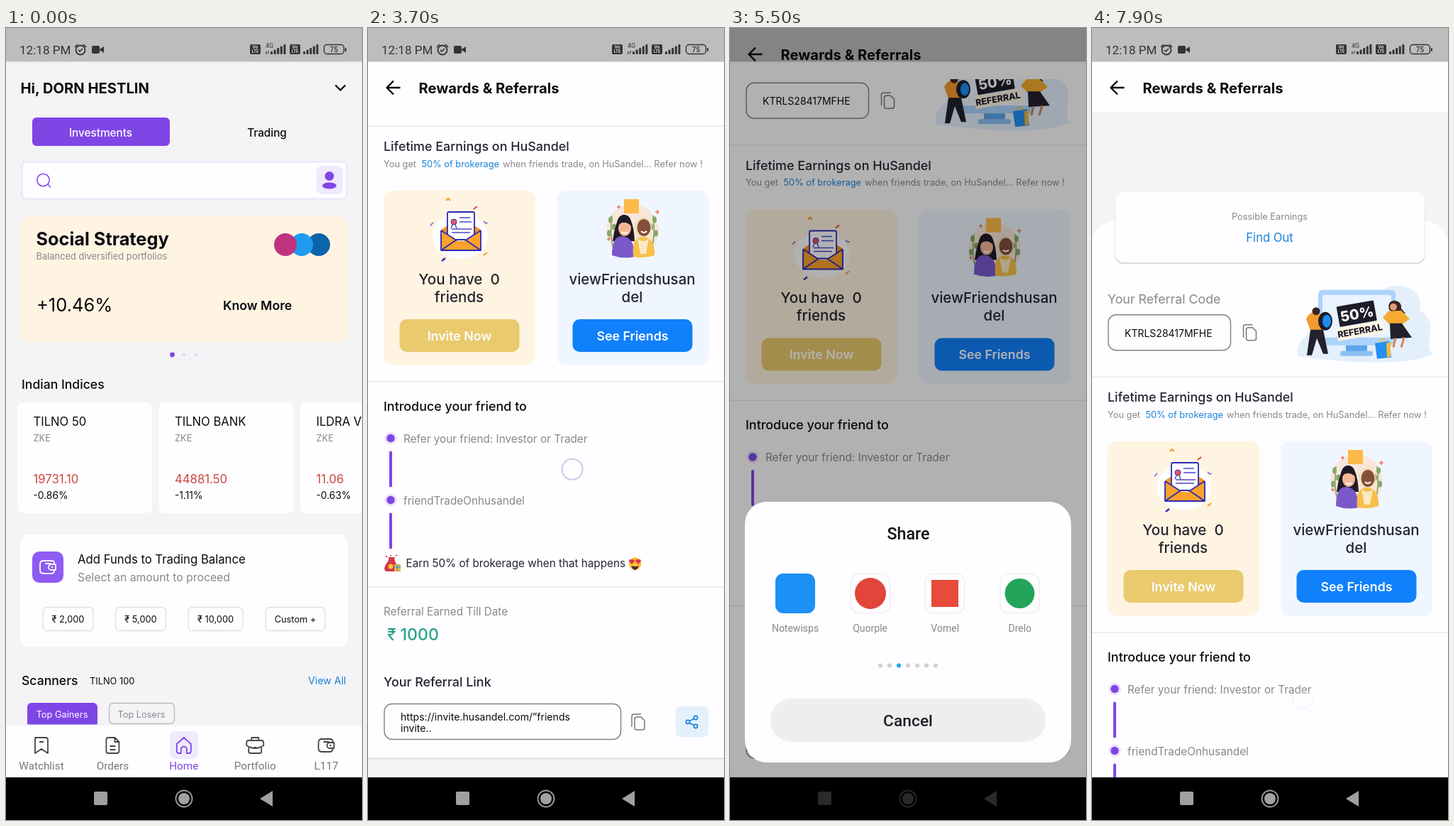
An HTML page for the animation above (8000 ms loop, 502 px wide and 1115 px high).

```html
<!DOCTYPE html>
<html lang="en">
<head>
<meta charset="utf-8">
<title>Referral walkthrough</title>
<style>
html, body { margin: 0; width: 100%; height: 100%; overflow: hidden; background: #fefdff; }
svg { display: block; width: 502px; height: 1115px; font-family: Inter, sans-serif; }
.roboto { font-family: Roboto, sans-serif; }
</style>
</head>
<body>
<svg id="stage" viewBox="0 0 502 1115"></svg>
<script>
const WHITE = '#fefdff', PAPER = '#f4f3f6', INK = '#0c0b10', DARK = '#262431', GREY = '#88878c',
      PURPLE = '#7f46e6', LILAC = '#f0e9fb', BLUE = '#1983dc', RED = '#c9473f', CREAM = '#fff4e1', LINE = '#e9e8eb';

// Shape helpers; text is placed by the middle of its capitals.
const rect = (x, y, w, h, r, fill, more = '') =>
  `<rect x="${x}" y="${y}" width="${w}" height="${h}" rx="${r}" fill="${fill}" ${more}/>`;
const circle = (x, y, r, fill, more = '') => `<circle cx="${x}" cy="${y}" r="${r}" fill="${fill}" ${more}/>`;
const oval = (x, y, rx, ry, fill) => `<ellipse cx="${x}" cy="${y}" rx="${rx}" ry="${ry}" fill="${fill}"/>`;
const shape = (d, fill) => `<path d="${d}" fill="${fill}"/>`;
const line = (d, color, w = 1.8) =>
  `<path d="${d}" fill="none" stroke="${color}" stroke-width="${w}" stroke-linejoin="round"/>`;
const text = (x, y, size, str, fill = INK, weight = 400, more = '') =>
  `<text x="${x}" y="${y + size * .36}" font-size="${size}" font-weight="${weight}" fill="${fill}" ${more}>${str}</text>`;
const mid = (x, y, size, str, fill, weight, more = '') =>
  text(x, y, size, str, fill, weight, 'text-anchor="middle" ' + more);
const group = (id, body) => `<g id="${id}">${body}</g>`;
const at = (x, y, body) => `<g transform="translate(${x} ${y})">${body}</g>`;
const each = (list, fn) => list.map(fn).join('');
const outline = (color, w = 1.3) => `stroke="${color}" stroke-width="${w}"`;
const ROBOTO = 'class="roboto"';

const wallet = (x, y, color) => at(x, y,
  line('M9 -4V-6Q9 -9 5 -9H-6Q-11 -9 -11 -4V4Q-11 9 -6 9H5Q9 9 9 5V4M-4 -5H4M11 -4H5A4 4 0 0 0 5 4H11Z', color) +
  circle(6, 0, 1.2, color));
const copyIcon = (x, y) => at(x, y,
  line('M-9 7V-8Q-9 -11 -6 -11H4M-5 -4Q-5 -7 -2 -7H4L9 -2V8Q9 11 6 11H-2Q-5 11 -5 8Z', '#77767b', 1.5));
const backArrow = line('M45.5 84H27M36 74.5L26.5 84L36 93.5', INK, 2.4);

const signal = x => each([0, 1, 2, 3, 4], i => rect(x + i * 4.6, 33 - i * 2.5, 3, 4 + i * 2.5, 1, '#343336'));
const volte = x => rect(x, 23, 15, 14, 2, '#343336') +
  mid(x + 7.5, 27.2, 6, 'Vo', '#ddd', 700) + mid(x + 7.5, 33, 5.5, 'LTE', '#ddd', 700);
const statusIcons = text(19, 30.5, 17.1, '12:18 PM', '#343336', 400, ROBOTO) +
  circle(105, 31, 6.5, 'none', outline('#343336', 1.8)) +
  line('M97 27L101 23M113 27L109 23M102 31L104 33L108 29', '#343336', 1.7) +
  rect(121, 25, 11, 11, 2, '#343336') + shape('M132 30L138 26V35L132 31Z', '#343336') +
  volte(344) + text(366, 25, 9, '4G', '#343336', 400, ROBOTO) +
  line('M367 37V33M370 32V36', '#343336', 1.2) + signal(373) + volte(400) + signal(419) +
  rect(448.5, 23.5, 28, 13, 4, 'none', outline('#343336', 1.4)) +
  mid(462.5, 30, 10, '75', '#343336', 500, ROBOTO) + rect(478, 28, 2, 5, 1, '#343336');

const navIcons = rect(124, 1075, 19, 19, 2, '#a09fa1') +
  circle(251, 1085, 11.5, 'none', outline('#a09fa1', 1.8)) + circle(251, 1085, 8, '#a09fa1') +
  shape('M358 1085L376 1074V1096Z', '#a09fa1');

const indexCard = (x, name, value, change) => rect(x, 527, 190, 156, 8, WHITE) +
  text(x + 22.5, 554, 16.6, name) + text(x + 22.5, 577.5, 12.8, 'ZKE', GREY) +
  text(x + 22.5, 635, 16.7, value, RED) + text(x + 22.5, 658.5, 13.8, change);

const tabs = [
  ['Watchlist', 'M-9 -11H6Q9 -11 9 -8V11L0 5L-9 11V-8Q-9 -11 -6 -11ZM-3 -5H3'],
  ['Orders', 'M-9 -8Q-9 -11 -6 -11H3L9 -5V8Q9 11 6 11H-6Q-9 11 -9 8ZM3 -11V-5H9M-4 1H4M-4 6H4'],
  ['Home', 'M-10 -2L0 -11L10 -2V8Q10 11 7 11H4V4Q0 -1 -4 4V11H-7Q-10 11 -10 8Z'],
  ['Portfolio', 'M-12 -4Q-12 -7 -9 -7H9Q12 -7 12 -4V0Q0 8 -12 0ZM-5 -7V-11H5V-7M-9 3V9Q-9 11 -6 11H6Q9 11 9 9V3M-2 3H2'],
  ['L117', '']];

const home = rect(0, 48, 502, 1010, 0, PAPER) +
  text(20.5, 84.5, 20.2, 'Hi, DORN HESTLIN', INK, 700) + line('M464.5 80.5L471.5 87.5L478.5 80.5', INK, 2.4) +
  rect(37, 126, 194, 40, 6, PURPLE) + mid(133.5, 147, 15.3, 'Investments', WHITE, 500) +
  mid(368, 147, 15.3, 'Trading', INK, 500) +
  rect(22.5, 188.5, 458, 52, 6, WHITE, outline('#ebe7fb', 2.5)) +
  circle(52.5, 214, 8.7, 'none', outline(PURPLE, 1.5)) + line('M59 220L63 224.5', PURPLE, 1.5) +
  rect(438, 194, 37, 40, 8, LILAC) + circle(456, 208.5, 6.5, PURPLE) + oval(456, 222, 10, 4.5, PURPLE) +
  rect(20, 265, 462, 178, 13, CREAM) + text(42.5, 297, 25.3, 'Social Strategy', INK, 700) +
  text(42.5, 321.5, 12.9, 'Balanced diversified portfolios', GREY) +
  circle(441, 305, 16, '#0c64ab') + circle(417, 305, 16, '#1f9bee') + circle(394, 305, 16, '#bf327f') +
  text(43, 390, 25.5, '+10.46%') + text(306, 391, 17.7, 'Know More', INK, 600) +
  circle(234.5, 460, 3.4, PURPLE) + circle(251, 460, 2, '#dcd3f4') + circle(267.5, 460, 2, '#dcd3f4') +
  text(22, 501.5, 17.6, 'Indian Indices', INK, 500) +
  indexCard(16, 'TILNO 50', '19731.10', '-0.86%') + indexCard(215.5, 'TILNO BANK', '44881.50', '-1.11%') +
  indexCard(415, 'ILDRA VI', '11.06', '-0.63%') +
  rect(20, 713, 462, 158, 13, WHITE) + rect(37, 737, 44, 44, 10, '#8e5bf3') + wallet(59, 759, WHITE) +
  text(101, 748, 16.7, 'Add Funds to Trading Balance') +
  text(101, 773, 15.8, 'Select an amount to proceed', GREY) +
  each([[52, 71, '₹ 2,000'], [154.5, 71, '₹ 5,000'], [257, 77, '₹ 10,000'], [366, 84, 'Custom +']], ([x, w, s]) =>
    rect(x, 815.5, w, 33, 6, WHITE, outline('#e0dfe3')) + mid(x + w / 2, 832.5, 12.8, s)) +
  text(22, 919, 17.6, 'Scanners', INK, 500) + text(118, 919, 12.8, 'TILNO 100') +
  text(426, 919, 14.2, 'View All', BLUE) +
  rect(30, 950, 99, 34, 6, PURPLE) + mid(79, 966, 12.8, 'Top Gainers', WHITE) +
  rect(145.5, 950.5, 92, 29, 6, 'none', outline('#b9b8bc')) + mid(191, 966, 12.8, 'Top Losers', GREY) +
  rect(-1, 981, 504, 80, 0, WHITE, outline('#ebeaee', 1)) + rect(231, 990, 40, 39, 8, LILAC) +
  each(tabs, ([name, d], i) => {
    const x = 50 + i * 100.4, on = i == 2;
    return (d ? at(x, 1010, line(d, on ? PURPLE : '#45444a')) : wallet(x, 1010, '#45444a')) +
      mid(x, 1038, 15.3, name, on ? PURPLE : '#77767b', 400, ROBOTO);
  });

const menu = (top, names) => rect(0, top, 502, names.length * 72.7, 15, WHITE) + each(names, (name, i) => {
  const y = top + 36.4 + i * 72.75;
  return text(20, y, 17.8, name, '#16151b') + line(`M462 ${y - 6.5}l6.5 6.5l-6.5 6.5`, INK, 2.4) +
    (i ? rect(0, y - 37, 502, 1.5, 0, LINE) : '');
});
const account = rect(0, 48, 502, 1010, 0, PAPER) + rect(0, 0, 502, 119, 0, WHITE) +
  at(-1, 0, backArrow) + text(92, 84.5, 20.2, 'Account', INK, 700) +
  rect(0, 119, 502, 123, 0, LILAC) + circle(60.5, 180, 41, WHITE) +
  circle(60.5, 174, 7.5, 'none', outline(PURPLE, 2.5)) + line('M49 194C49 179 72 179 72 194', PURPLE, 2.5) +
  text(122, 165.5, 20.4, 'DORN HESTLIN', '#16151b') + text(122, 199, 15.3, 'L117', '#16151b') +
  line('M469 169L481 180.5L469 192', '#77767b', 2.5) +
  menu(241.5, ['Funds', 'Trade Settings', 'Rewards &amp; Referrals', 'About', 'External Apps', 'Link Family Accounts']) +
  text(11, 715, 17.8, 'Security', DARK) + menu(737, ['Support Portal', 'User Manual', 'Contact']) +
  text(11, 991, 17.8, 'Reports', DARK) + menu(1013.5, ['P&amp;L', 'Tax']);

const referralArt =
  shape('M290 370C286 345 308 345 312 325C320 288 360 295 395 290C410 262 470 264 462 305C492 325 466 350 480 368C430 388 330 376 290 370Z', '#e4effc') +
  rect(358, 352, 30, 12, 2, '#5fa5ec') + rect(350, 363, 46, 7, 3, '#8cc0f5') +
  rect(319, 277, 109, 78, 6, '#acd3fb') + rect(325, 284, 97, 60, 3, '#eaf4ff') +
  `<g transform="rotate(-10 373 312)">` + rect(347, 296, 53, 29, 1, '#1d1c2a') +
  mid(374, 311, 20, '50%', WHITE, 800) + rect(341, 326, 67, 18, 1, '#fff6e4') +
  mid(374, 335, 12.5, 'REFERRAL', '#1d1c2a', 800) + '</g>' +
  shape('M302 318Q308 304 321 310L330 318L325 336L308 334Z', '#f29a2e') + circle(316, 307, 5.5, '#3a2420') +
  shape('M308 333H326L333 367H326L317 345L310 369H303Z', '#22212c') +
  oval(329, 321, 10, 13, '#1d1c2a') + oval(331, 321, 6, 9, '#1b8cf0') +
  shape('M419 305Q416 293 426 292Q437 293 436 303L442 310L428 312Z', '#3b2226') + circle(425, 301, 5, '#e39a74') +
  shape('M418 307L436 306L448 318L436 326H420L410 316Z', '#f5ab2f') +
  shape('M420 324H437L451 344L421 346Z', '#22212c') +
  line('M428 345L425 358M440 344L436 358', '#d9825c', 3) +
  shape('M399 352L419 349L422 372L402 374Z', '#2490ef') + shape('M415 352L421 350V371L416 372Z', '#f6b73b') +
  line('M405 351Q408 341 413 350', '#f6b73b', 1.5);

const inviteArt = oval(130, 293, 39, 32, WHITE) +
  shape('M103 284L131 266L159 284V312H103Z', '#f49320') +
  rect(112, 259, 38, 45, 2, WHITE, outline('#2c2bb4', 1.8)) +
  line('M129 267H144M129 273H146M118 283H146M118 288H144', '#4947c8', 1.5) +
  circle(121, 273, 4, '#ea5664', outline('#2c2bb4', 1)) + line('M119 277L117 282M123 277L125 282', '#2c2bb4', 1.2) +
  shape('M103 285L127 300H135L159 285V313H103Z', '#fca12b') +
  line('M103 285V313H159V285M103 313L125 298H137L159 313M103 285L125 299M159 285L137 299', '#2c2bb4', 1.8) +
  line('M110 243L113 240L116 243M163 320L168 316', '#f39a2c', 2.2) + line('M149 255L154 251', '#e34c4c', 2.2) +
  line('M104 328L109 324', '#2c2bb4', 2.4) + line('M88 278L92 274M163 272L166 275L169 274', '#8a79e0', 1.8);

const friendsArt = circle(373, 285, 37, '#f8e6da') + rect(361, 241, 21, 20, 0, '#fdba4a') +
  line('M348 316Q340 295 344 264M398 316Q406 295 402 264', '#7a9a62', 1.5) +
  each([[342, 270], [347, 280], [340, 289], [404, 270], [399, 280], [406, 289]], ([x, y]) => oval(x, y, 3, 4.5, '#86a868')) +
  shape('M345 300Q350 263 361 263Q374 263 376 300Z', '#1f1a25') + oval(388, 281, 12, 15, '#f2dfbd') +
  shape('M344 320Q344 293 358 293Q376 294 376 322Q360 326 344 320Z', '#7a58c9') +
  shape('M374 322Q371 294 388 294Q405 295 404 320Q390 325 374 322Z', '#f6c04a') +
  shape('M380 296Q388 304 396 296L392 318H384Z', '#fbe9c4') +
  oval(362, 282, 9, 11, '#f4b795') + oval(389, 281, 9.5, 12, '#84503a') +
  shape('M351 281Q358 268 371 278Q372 264 361 263Q350 264 351 281Z', '#1f1a25') +
  line('M358 287Q362 291 366 287M385 286Q389 290 393 286', WHITE, 2) +
  line('M337 297H342M339.5 294.5V299.5M405 259H411M408 256V262M351 252H356M353.5 249.5V254.5', '#ee7468', 1.6);

const step = (y, label) => circle(32, y, 9, '#ece4fa') + circle(32, y, 5.7, PURPLE) +
  rect(30, y + 18, 4, 51, 2, PURPLE) + text(50, y + .5, 15.3, label, GREY);
const divider = y => rect(0, y, 502, 1.5, 0, LINE);
const action = (x, fill, label) => rect(x, 410, 169, 46, 10, fill) + mid(x + 84.5, 433.5, 17.8, label, WHITE, 600);

const rewardsTop = shape('M0 212A32 32 0 0 1 32 180H470A32 32 0 0 1 502 212V1289H0Z', WHITE) +
  rect(0, 1289, 502, 1.5, 0, '#d6d5d9') +
  rect(32.5, 141, 437, 99.5, 12, '#d9d8dc') + rect(33, 139.5, 436, 99, 12, WHITE) +
  mid(250.5, 173.5, 12.8, 'Possible Earnings', GREY) + mid(250.5, 203.5, 16.6, 'Find Out', BLUE) +
  text(22, 289.5, 17.8, 'Your Referral Code', GREY) +
  rect(23, 312, 172.5, 50, 11, WHITE, outline('#828186', 1.4)) + text(46, 338, 14, 'KTRLS28417MFHE') +
  copyIcon(222.5, 337) + referralArt;

const rewardsRest = divider(137.5) + text(22, 167, 17.9, 'Lifetime Earnings on HuSandel', DARK, 500) +
  text(22, 191, 12.8, 'You get', GREY) + text(75.5, 191, 12.8, '50% of brokerage', BLUE) +
  text(190, 191, 12.8, 'when friends trade, on HuSandel... Refer now !', GREY) +
  rect(22, 228.5, 214, 246, 13, CREAM) + rect(266, 228.5, 214, 246, 13, '#eff6ff') + inviteArt + friendsArt +
  mid(128.5, 353.5, 20.6, 'You have&#160; 0', DARK, 500) + mid(128.5, 378.5, 20.6, 'friends', DARK, 500) +
  mid(372.5, 353.5, 20.5, 'viewFriendshusan', DARK, 500) + mid(372.5, 378.5, 20.5, 'del', DARK, 500) +
  action(44.5, '#e9ca6d', 'Invite Now') + action(288.5, '#1080fb', 'See Friends') + divider(497) +
  text(22, 532.5, 17.9, 'Introduce your friend to', INK, 500) +
  step(577.5, 'Refer your friend: Investor or Trader') + step(664.5, 'friendTradeOnhusandel') +
  shape('M29 745H38Q36 749 40 754Q44 765 39 765H26Q21 764 25 755Q30 750 29 745Z', '#d5364a') +
  line('M25 743L27 745M32 742V744M39 743L41 742', '#d5364a', 1.5) + circle(32, 758, 3.5, '#f8c53f') +
  rect(37, 755, 9, 10, 1, '#f3b13c') + line('M41.5 755V765M37 759H46', '#3fa0d8', 1.5) +
  text(53.5, 754, 15.25, 'Earn 50% of brokerage when that happens', DARK) +
  circle(376.5, 754, 8.8, '#fbc23a') + shape('M371 757Q376.5 759 382 757Q380 763 376.5 763Q373 763 371 757Z', '#59302a') +
  each([372, 381], x => shape(`M${x} 755L${x - 4} 750.5Q${x - 3} 746.5 ${x} 749Q${x + 3} 746.5 ${x + 4} 750.5Z`, '#e2324a')) +
  divider(786.5) + text(22, 821, 15.3, 'Referral Earned Till Date', GREY) +
  text(27, 854, 23, '₹', '#27a48c', 500) + text(45.5, 854, 23.2, '1000', '#27a48c', 500) +
  text(22, 920.5, 17.9, 'Your Referral Link', DARK, 500) +
  rect(23, 951.5, 333.5, 50, 11, WHITE, outline('#828186', 1.4)) +
  text(46, 969.5, 14.1, 'https://invite.husandel.com/”friends') + text(46, 986, 14.1, 'invite..') +
  copyIcon(381, 977) + rect(434, 955, 46, 43.5, 7, '#e3f1fc') +
  line('M451 977L462 971M451 977L462 983', BLUE, 1.7) +
  each([[451, 977], [462, 971], [462, 983]], ([x, y]) => circle(x, y, 2.6, '#e3f1fc', outline(BLUE, 1.7)));

const rewards = rect(0, 48, 502, 1060, 0, PAPER) + group('scroll', rewardsTop + at(0, 261.3, rewardsRest)) +
  rect(0, 0, 502, 119, 0, WHITE) + backArrow + text(71.5, 84.5, 20.2, 'Rewards &amp; Referrals', INK, 700);

const apps = ['Notewisps', 'Quorple', 'Vomel', 'Drelo'];
const tile = x => rect(x - 27.5, 768.5, 55, 55, 11, WHITE, outline('#f0eff2', 1.5));
const sheet = rect(21, 667, 460, 367, 31, WHITE) + mid(251.5, 712, 23.3, 'Share', '#141318', 500, ROBOTO) +
  rect(64, 768, 56, 56, 11, '#1d90f5') +
  tile(198) + circle(198, 796, 22, '#e2453a') + tile(303) + rect(284, 777, 38, 38, 0, '#e84a3c') +
  tile(408.5) + circle(408.5, 796, 21, '#22a55b') +
  each(apps, (name, i) => mid(92 + i * 105.6, 845, 14, name, GREY, 400, ROBOTO)) +
  each([0, 1, 2, 3, 4, 5, 6], i => circle(212 + i * 13, 897.5, 3.1, i == 2 ? '#25aeee' : '#d2d1d5')) +
  rect(57, 944, 388, 61, 30, '#efedf0') + mid(251, 975, 22.8, 'Cancel', '#202025', 500, ROBOTO);

const stage = document.getElementById('stage');
stage.innerHTML = home + group('account', account) + group('rewards', rewards) +
  rect(0, 0, 502, 47.5, 0, '#000', 'opacity=".255"') + group('status', statusIcons) +
  rect(0, 1055, 502, 60, 0, '#000') + group('nav', navIcons) +
  rect(0, 0, 502, 1115, 0, '#000', 'id="dim"') + group('sheet', sheet) +
  circle(0, 0, 14.5, '#ffffff88', 'id="touch" stroke="#b4bce0" stroke-opacity=".75" stroke-width="2"');

const part = Object.fromEntries(['account', 'rewards', 'scroll', 'status', 'nav', 'dim', 'sheet', 'touch']
  .map(id => [id, document.getElementById(id)]));
const move = (el, x, y) => el.setAttribute('transform', `translate(${x.toFixed(2)} ${y.toFixed(2)})`);
const fade = (el, a) => el.setAttribute('opacity', a);

// Critically damped slide from the right edge.
const slideIn = ms => { const u = Math.max(0, ms) * .017; return 502 * Math.exp(-u) * (1 + u); };

// Keys are [time, value] pairs, joined with a soft ease-out.
function follow(keys, t) {
  const i = keys.findIndex(k => k[0] > t);
  if (i < 0) return keys[keys.length - 1][1];
  if (i == 0) return keys[0][1];
  const [a, from] = keys[i - 1], [b, to] = keys[i];
  return from + (to - from) * (1 - (1 - (t - a) / (b - a)) ** 2);
}
const SCROLL = [[3100, 0], [3700, -261.3], [4200, -234.8], [7500, -234.8], [7900, 91.7]];
const SHEET = [[4700, 367], [5000, 0], [7350, 0], [7500, 448]];
const DIM = [[4700, .12], [5000, .3], [7350, .3], [7500, .05]];
// start, end, x, y, dragging
const TOUCHES = [[700, 880, 456, 214, 0], [1990, 2090, 240, 424, 0], [3050, 3850, 288, 882.5, 1],
  [4400, 4580, 457, 1003, 0], [6400, 6750, 117, 825, 0], [7500, 7925, 297, 852, 1]];

function draw(now) {
  const t = Math.floor((now + 16) / 100) * 100 % 8000;   // ten pictures a second
  const modal = t >= 4700 && t < 7500, lift = modal ? -47 : 0, scroll = follow(SCROLL, t);
  move(part.account, slideIn(t - 894), 0);
  move(part.rewards, slideIn(t - 2085), lift);
  move(part.scroll, 0, scroll - lift);
  fade(part.status, modal && t > 4800 ? 0 : 1);
  fade(part.nav, modal ? .38 : 1);
  fade(part.dim, modal ? follow(DIM, t) : 0);
  fade(part.sheet, modal ? 1 : 0);
  move(part.sheet, 0, follow(SHEET, t));
  const touch = TOUCHES.find(([a, b]) => t >= a && t < b);
  fade(part.touch, touch ? Math.min(1, (touch[1] - t) / 150) : 0);
  if (touch) move(part.touch, touch[2], touch[3] + (touch[4] ? scroll : 0));
  requestAnimationFrame(draw);
}
draw(performance.now());
</script>
</body>
</html>
```
